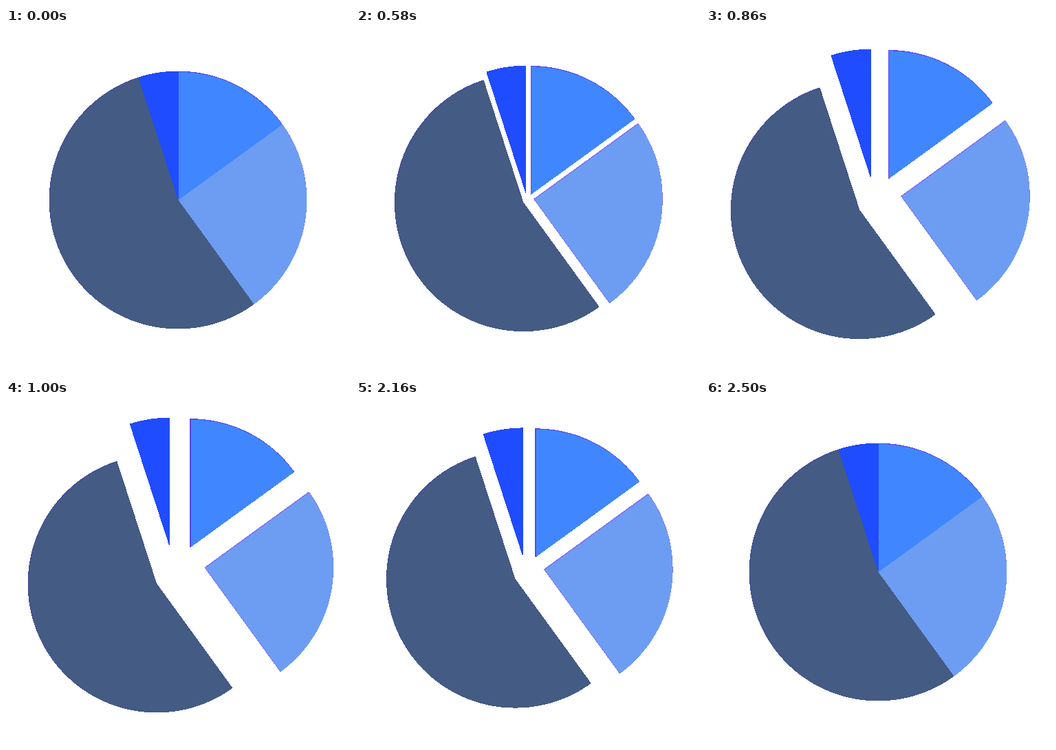
Recreate the animation shown at these times as a matplotlib script. Size 500x500 px, loop 3020 ms.

```python
import matplotlib.pyplot as plt
import numpy as np
from matplotlib.animation import FuncAnimation
from matplotlib.patches import Polygon

SIZE, STEP, FRAMES = 500, 20, 151
CENTER, RADIUS = 250, 187.3
GROW = 0.45              # aliased fills spread about half a pixel outwards
RIM_WIDTH = 0.8
FACE_SHIFT = np.array([0.55, 0.55])

# share of the pie, face colour, rim colour, travel when pulled apart
SLICES = [
    (15, "#4087ff", "#5a48ea", (17.5, -35.5)),
    (25, "#6d9df3", "#7f70f2", (38.7, -6.5)),
    (55, "#445b83", "#454f9c", (-31.0, 17.0)),
    (5, "#204cff", "#2446f4", (-12.2, -37.0)),
]

fig = plt.figure(figsize=(SIZE / 100, SIZE / 100), dpi=100, facecolor="white")
ax = fig.add_axes([0, 0, 1, 1])
ax.set(xlim=(0, SIZE), ylim=(SIZE, 0))
ax.axis("off")


def polar(radius, angle):
    return np.column_stack([radius * np.cos(angle), radius * np.sin(angle)])


def sector(start, end, side, arc):
    """Pie slice with its straight sides and its arc moved inwards."""
    radius = RADIUS - arc
    trim = np.arcsin(side / radius)
    tip = polar(side / np.sin((end - start) / 2), np.array([(start + end) / 2]))
    curve = polar(radius, np.linspace(start + trim, end - trim, 120))
    return np.vstack([tip, curve])


def add_shape(color, z):
    shape = Polygon(np.zeros((3, 2)), facecolor=color, linewidth=0,
                    antialiased=False, snap=False, zorder=z)
    return ax.add_patch(shape)


def build():
    parts, start = [], -np.pi / 2
    for share, color, rim, travel in SLICES:
        end = start + 2 * np.pi * share / 100
        parts.append((add_shape(rim, 1), add_shape(color, 2),
                      start, end, np.array(travel)))
        start = end
    return parts


def ease(t):
    t = min(max(t, 0), 1)
    return t * t * (3 - 2 * t)


def spread(ms):
    return ease((ms - 400) / 600) - ease((ms - 1900) / 600)


parts = build()


def update(i):
    k = spread(i * STEP)
    # side rims only come out once the slices part
    side = GROW + RIM_WIDTH * min(1, 8 * k)
    for rim, face, start, end, travel in parts:
        pos = CENTER + k * travel
        rim.set_xy(pos + sector(start, end, GROW, GROW))
        face.set_xy(pos + FACE_SHIFT
                    + sector(start, end, side, GROW + RIM_WIDTH))
    return [shape for part in parts for shape in part[:2]]


anim = FuncAnimation(fig, update, frames=FRAMES, interval=STEP,
                     repeat=True, repeat_delay=0, blit=False)
plt.show()
```
